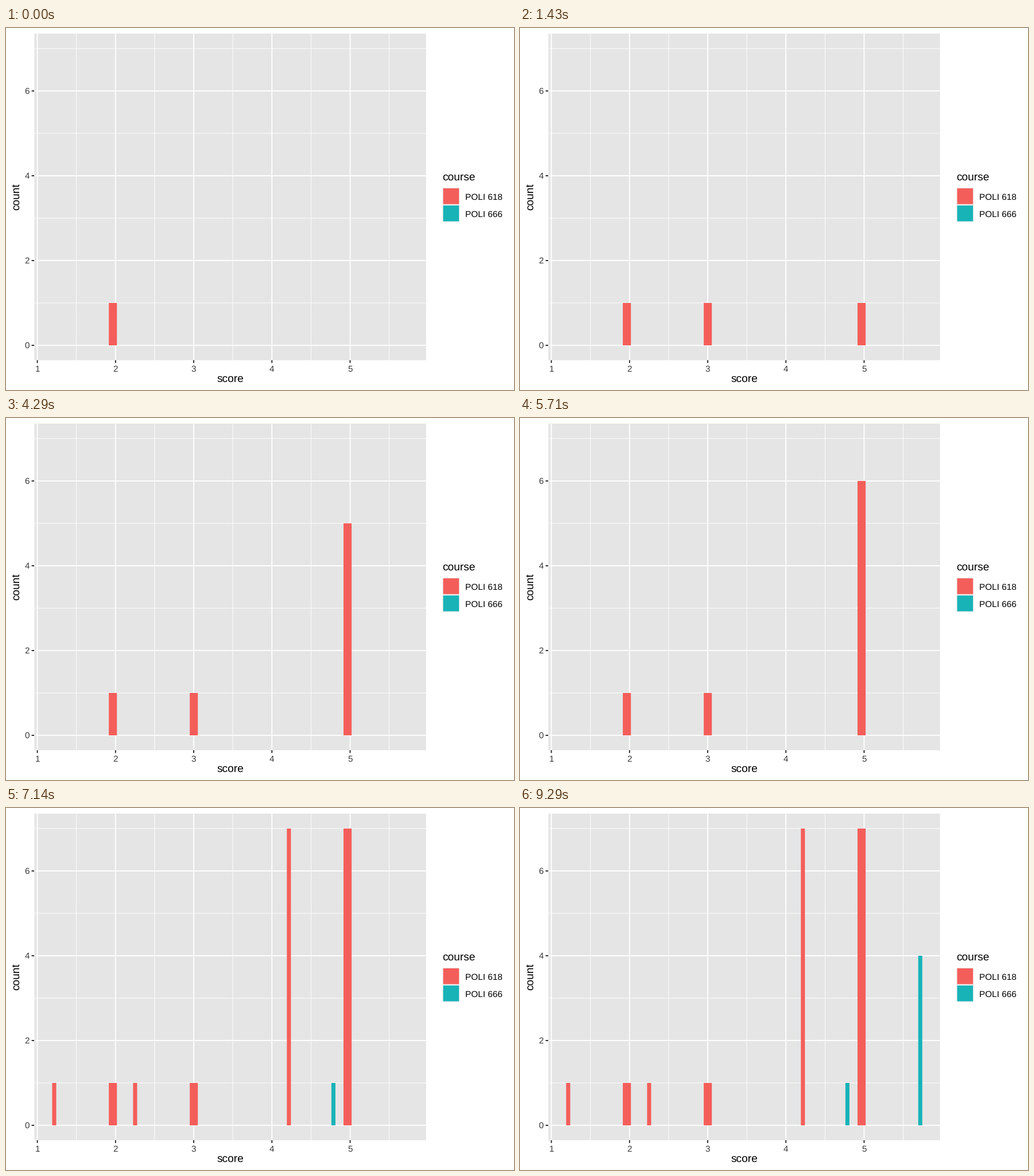
These frames come from a looping animation (885x632 px, 10000 ms). A matplotlib script:

```python
import matplotlib.pyplot as plt
from matplotlib.animation import FuncAnimation
from matplotlib.patches import Rectangle

W, H, DPI = 885, 632, 64
PT = 72 / DPI  # points per pixel
LOOP, STEPS = 10000, 14

RED, TEAL = "#F45E5A", "#17B3B7"
PANEL, KEY = "#E5E5E5", "#EEEEEE"
TICK, LABEL = "#222222", "#3A3A3A"

LEFT, RIGHT, TOP, BOTTOM = 49.4, 731.8, 9.8, 580.0
BIN0, BIN = 80.42, 7.05  # first half-bin edge and half-bin width
MAJOR, MINOR = 1.85, 0.93
SMALL, BIG = 15.3, 19.1

plt.rcParams["font.family"] = "Liberation Sans"
plt.rcParams["text.hinting"] = "none"

fig = plt.figure(figsize=(W / DPI, H / DPI), dpi=DPI, facecolor="white")
ax = fig.add_axes([0, 0, 1, 1])
ax.set_xlim(0, W)
ax.set_ylim(H, 0)
ax.axis("off")


def px(score):
    return 54.6 + 136.22 * (score - 1)


def py(count):
    return 554.05 - 74.03 * count


def rect(x, y, w, h, color, z=1):
    patch = Rectangle((x, y), w, h, fc=color, lw=0, zorder=z, snap=False)
    return ax.add_patch(patch)


def line(x0, y0, x1, y1, width, color="white", z=2):
    ax.plot([x0, x1], [y0, y1], color=color, lw=width * PT, zorder=z,
            solid_capstyle="butt", snap=False)


def label(x, y, s, size, color="black", ha="left", **kw):
    ax.text(x, y, s, fontsize=size * PT, color=color, ha=ha,
            va="baseline", **kw)


def draw_panel():
    rect(LEFT, TOP, RIGHT - LEFT, BOTTOM - TOP, PANEL)
    for k in range(1, 6):
        line(px(k + 0.5), TOP, px(k + 0.5), BOTTOM, MINOR)
    for c in (1, 3, 5, 7):
        line(LEFT, py(c), RIGHT, py(c), MINOR)
    for k in range(1, 6):
        x = px(k)
        line(x, TOP, x, BOTTOM, MAJOR, z=3)
        line(x, BOTTOM, x, BOTTOM + 4.8, MAJOR, TICK)
        label(x, 600.3, str(k), SMALL, LABEL, "center")
    for c in (0, 2, 4, 6):
        y = py(c)
        line(LEFT, y, RIGHT, y, MAJOR, z=3)
        line(LEFT - 4.8, y, LEFT, y, MAJOR, TICK)
        label(41, y + 5.3, str(c), SMALL, LABEL, "right")
    label(390.6, 618, "score", BIG, ha="center")
    ax.text(23.4, 295, "count", fontsize=BIG * PT, rotation=90,
            rotation_mode="anchor", ha="center", va="baseline")


def draw_legend():
    label(760.4, 266.3, "course", BIG)
    for i, (name, color) in enumerate((("POLI 618", RED), ("POLI 666", TEAL))):
        y = 278.7 + 30 * i
        rect(760.4, y, 30, 30, KEY)
        rect(761.6, y + 1.2, 27.6, 27.6, color, 2)
        label(800, y + 20.7, name, SMALL + 0.1)


# half-bin index, width in half-bins, colour, first step, final count, grows
BARS = [
    (14, 2, RED, 0, 1, False),
    (34, 2, RED, 1, 1, False),
    (72, 2, RED, 2, 7, True),
    (0, 1, RED, 9, 1, False),
    (20, 1, RED, 9, 1, False),
    (58, 1, RED, 9, 7, False),
    (69, 1, TEAL, 9, 1, False),
    (87, 1, TEAL, 10, 4, True),
]

draw_panel()
draw_legend()
bars = [rect(BIN0 + BIN * i, py(0), BIN * w, 0, color, 5)
        for i, w, color, *_ in BARS]


def count_at(step, start, final, grows):
    if step < start:
        return 0
    return min(step - start + 1, final) if grows else final


def update(step):
    for bar, (_, _, _, start, final, grows) in zip(bars, BARS):
        n = count_at(step, start, final, grows)
        bar.set_visible(n > 0)
        bar.set_y(py(n))
        bar.set_height(py(0) - py(n))
    return bars


anim = FuncAnimation(fig, update, frames=STEPS, interval=LOOP / STEPS,
                     init_func=lambda: update(0), repeat=True,
                     repeat_delay=0, blit=False)
plt.show()
```
